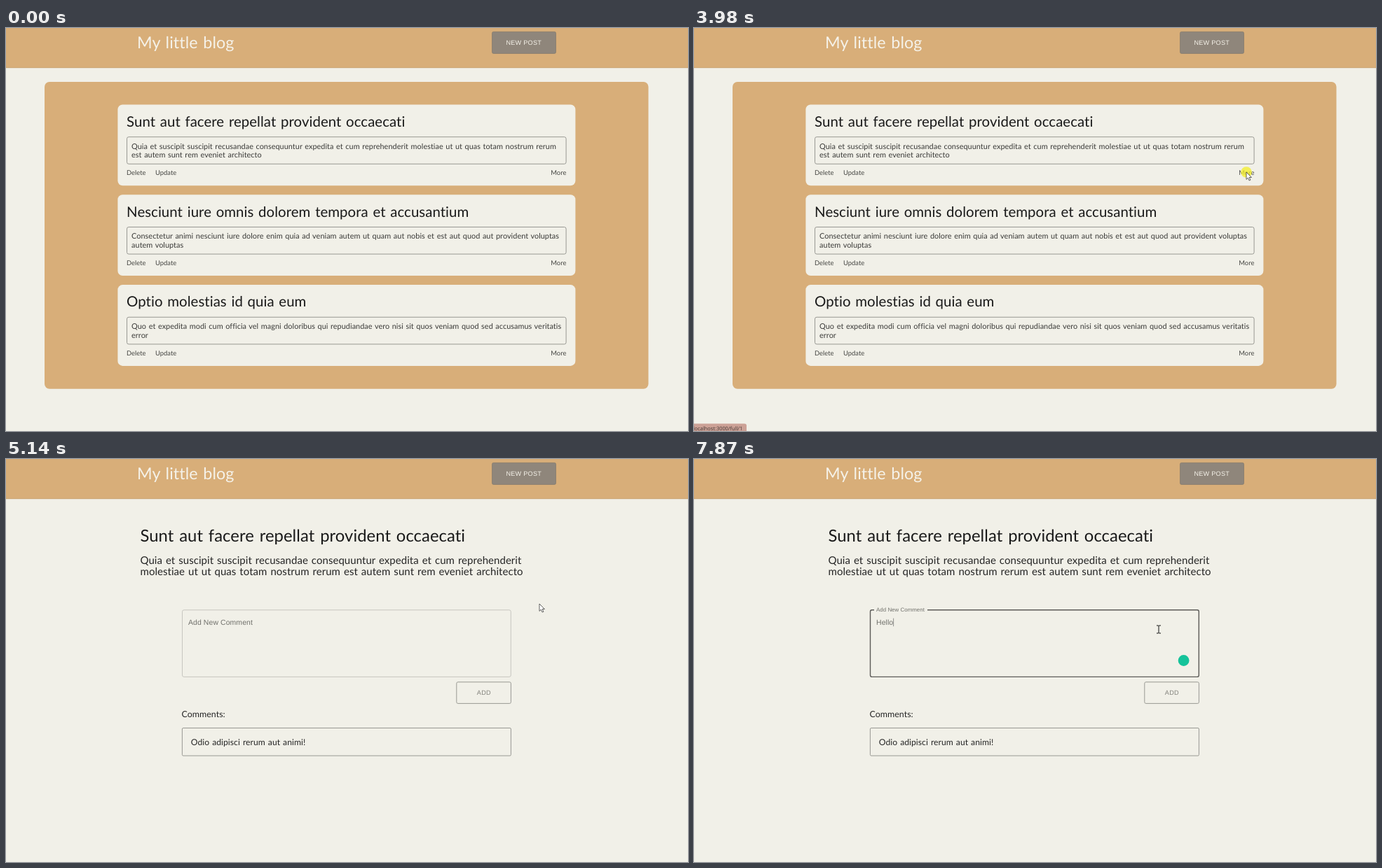
Animation of 973x576 px, one loop 8000 ms. Source, as an HTML page:

```html
<!DOCTYPE html>
<html lang="en">
<head>
<meta charset="utf-8">
<title>My little blog</title>
<style>
  html, body { margin: 0; width: 100%; height: 100%; overflow: hidden; background: #f1f0e8; }
  svg { display: block; width: 973px; height: 576px; text-rendering: geometricPrecision; }
  text { font-family: Lato, sans-serif; letter-spacing: .003em; word-spacing: .07em; fill: #1a1a1a; }
  .ui { font-family: "Liberation Sans", Arial, sans-serif; letter-spacing: .0094em; word-spacing: 0; fill: #70706b; }
  .btn { font-size: 9.13px; letter-spacing: .0286em; }
  .body { font-size: 10.9px; fill: #3a3a38; }
  .link { font-size: 9.4px; fill: #444441; }
  .lead { font-size: 15px; fill: #262626; }
  .box { fill: none; stroke: #8f8f89; stroke-width: .9; }
</style>
</head>
<body>
<svg viewBox="0 0 973 576">
  <rect width="973" height="57" fill="#d8ae79"/>
  <rect y="56.4" width="973" height=".8" fill="#c6a171"/>
  <text x="187" y="29" font-size="23.3" style="fill:#f5f2e9">My little blog</text>
  <rect x="693.5" y="5.4" width="91" height="31" rx="2" fill="#8f867b" stroke="#80776c" stroke-width=".7"/>
  <text class="ui btn" x="713.4" y="24" style="fill:#f5f2e9">NEW POST</text>

  <g id="list">
    <rect x="55" y="77" width="861.5" height="438.7" rx="7" fill="#d8ae79"/>
  </g>

  <g id="post">
    <text x="191.5" y="118" font-size="23.8">Sunt aut facere repellat provident occaecati</text>
    <text class="lead" x="191.5" y="149.6">Quia et suscipit suscipit recusandae consequuntur expedita et cum reprehenderit</text>
    <text class="lead" x="191.5" y="166.4">molestiae ut ut quas totam nostrum rerum est autem sunt rem eveniet architecto</text>
    <rect id="field" x="251.5" y="215.8" width="468.8" height="95.6" rx="2.4" fill="none"/>
    <rect id="notch" x="257" y="214" height="3.2" fill="#f1f0e8"/>
    <text id="label" class="ui" x="260">Add New Comment</text>
    <text id="typed" class="ui" x="260" y="237" font-size="10.44"></text>
    <rect id="caret" y="227.6" width=".8" height="11.6" fill="#777"/>
    <circle id="badge" cx="698.6" cy="288" r="7.9" fill="#15c39a"/>
    <rect class="box" x="642.8" y="318.8" width="77.6" height="30.6" rx="2"/>
    <text class="ui btn" x="671.8" y="337.4" style="fill:#82827c">ADD</text>
    <text class="lead" x="250.5" y="368.5" style="font-size:12.4px">Comments:</text>
    <rect class="box" x="251.4" y="384.5" width="469" height="39.6" rx="1.5"/>
    <text class="lead" x="263.8" y="408.6" style="font-size:12.15px">Odio adipisci rerum aut animi!</text>
  </g>

  <g id="status">
    <path id="bar" fill="#cca196"/>
    <text x="-1" y="575.4" font-size="7.4" style="font-family:'Open Sans',sans-serif;letter-spacing:0;fill:#403532">localhost:3000/full/1</text>
  </g>

  <circle id="click" cx="788" cy="206" r="7.8" fill="#f3ee2e" opacity=".78"/>
  <path id="arrow" d="M0 0V10.4L2.4 8.2L4.1 12L5.9 11.2L4.2 7.5H7.4Z" fill="#fff" stroke="#222" stroke-width=".7" stroke-linejoin="round"/>
  <path id="beam" d="M-3-5.5H-.8L0-4.8L.8-5.5H3M0-4.8V4.8M-3 5.5H-.8L0 4.8L.8 5.5H3" fill="none" stroke="#111"/>
</svg>
<script>
const $ = id => document.getElementById(id);
const show = (id, on) => $(id).style.display = on ? '' : 'none';
const set = (id, attrs) => { for (const k in attrs) $(id).setAttribute(k, attrs[k]); };
const ease = p => { p = Math.max(0, Math.min(1, p)); return p * p * (3 - 2 * p); };

const posts = [
  ['Sunt aut facere repellat provident occaecati',
   'Quia et suscipit suscipit recusandae consequuntur expedita et cum reprehenderit molestiae ut ut quas totam nostrum rerum',
   'est autem sunt rem eveniet architecto'],
  ['Nesciunt iure omnis dolorem tempora et accusantium',
   'Consectetur animi nesciunt iure dolore enim quia ad veniam autem ut quam aut nobis et est aut quod aut provident voluptas',
   'autem voluptas'],
  ['Optio molestias id quia eum',
   'Quo et expedita modi cum officia vel magni doloribus qui repudiandae vero nisi sit quos veniam quod sed accusamus veritatis',
   'error']
];
$('list').innerHTML += posts.map(([title, line1, line2], i) => `
  <g transform="translate(159.4 ${109.5 + 128.8 * i})">
    <rect width="653" height="115.8" rx="7" fill="#f1f0e8"/>
    <text x="12.7" y="31.3" font-size="20.4">${title}</text>
    <rect class="box" x="13.1" y="46.2" width="626.6" height="38.6" rx="2.6"/>
    <text class="body" x="19.7" y="63">${line1}</text>
    <text class="body" x="19.7" y="75.9">${line2}</text>
    <text class="link" x="12.6" y="100.5">Delete</text>
    <text class="link" x="53.6" y="100.5">Update</text>
    <text class="link" x="640" y="100.5" text-anchor="end">More</text>
  </g>`).join('');

// pointer stops: time, x, y
const stops = [
  [490, 941, 567], [540, 958, 567], [900, 958, 567], [1480, 816, 286], [2400, 816, 286],
  [2900, 786, 190], [3260, 783, 209], [3340, 788, 206], [5060, 788, 206], [5140, 761, 207],
  [5570, 663, 243.5]
];
const keyTimes = [7060, 7280, 7440, 7710, 7870];

function pointer(t) {
  const next = stops.findIndex(s => s[0] > t);
  if (next < 1) return stops[next < 0 ? stops.length - 1 : 0].slice(1);
  const [a, b] = [stops[next - 1], stops[next]];
  const p = ease((t - a[0]) / (b[0] - a[0]));
  return [a[1] + (b[1] - a[1]) * p, a[2] + (b[2] - a[2]) * p];
}

function draw(now) {
  const t = now % 8000;
  show('list', t < 4060);
  show('post', t >= 4330);
  show('status', t >= 3550 && t < 4490);
  set('bar', { d: `M0 565.6H${t < 4060 ? 72 : 319}q3 0 3 3V576H0Z` });
  show('click', t >= 3840 && t < 4060);

  const [x, y] = pointer(t);
  const inside = t > 5000 && x < 720 && y > 215;
  show('arrow', t >= 490 && !inside);
  show('beam', inside);
  set(inside ? 'beam' : 'arrow', { transform: `translate(${x} ${y})` });

  const focused = t >= 6080;
  const lift = ease((t - 6080) / 200);
  set('field', {
    stroke: focused ? '#5c5b58' : inside ? '#3a3a37' : '#bdbcb5',
    'stroke-width': focused ? 1.4 : .8
  });
  set('notch', { width: 76 * lift });
  set('label', { y: 236.7 - 19 * lift, 'font-size': 10.44 - 2.61 * lift });

  const typed = 'Hello'.slice(0, keyTimes.filter(k => t >= k).length);
  $('typed').textContent = typed;
  show('caret', focused && (typed || (t - 6080) % 1060 < 530));
  set('caret', { x: 260 + (typed ? $('typed').getComputedTextLength() : 0) });
  show('badge', t >= 7360);
  requestAnimationFrame(draw);
}
draw(performance.now());
</script>
</body>
</html>
```
